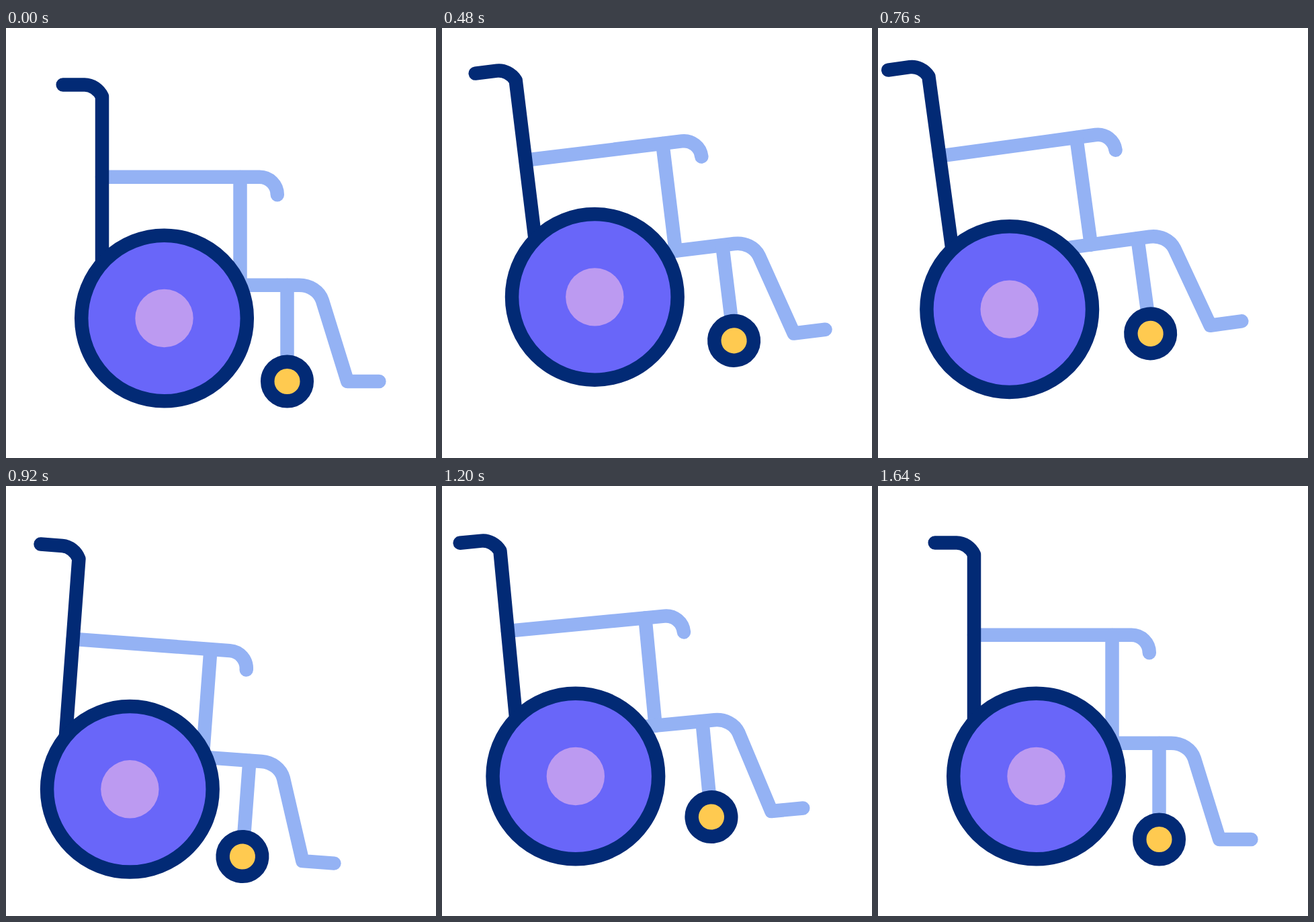
Write an HTML page that moves like this. It is 640 by 640 pixels and loops after 2 s.

```html
<!DOCTYPE html>
<html lang="en">
<head>
<meta charset="utf-8">
<title>Wheelchair</title>
<style>
  html, body { margin: 0; width: 100%; height: 100%; overflow: hidden; background: #fff; }
  svg { display: block; width: 100%; height: 100%; }
  .line { fill: none; stroke-width: 20.5; stroke-linecap: round; stroke-linejoin: round; }
  .light { stroke: #94b2f4; }
  .navy { stroke: #022a75; }
</style>
</head>
<body>
<svg viewBox="0 0 640 640">
  <g id="chair">
    <g class="line light">
      <path d="M143 221.8H377.3C392 221.8 403.8 233.6 403.8 248.3"/>
      <path d="M348.5 222V383"/>
      <path d="M282 382.8H436.5C452 382.8 466 391.5 470.8 405.5L508.2 526H555.4"/>
      <path d="M418.5 383V500"/>
    </g>
    <path class="line navy" d="M84.7 84.5H117C127.5 84.5 138 91.5 143 102V375"/>
    <circle class="line navy" cx="418.5" cy="526" r="29.3" style="fill:#ffca50"/>
  </g>
  <g id="wheel">
    <circle class="line navy" cx="235.5" cy="432" r="123.3" style="fill:#6966f9"/>
    <circle cx="235.5" cy="432" r="43.2" fill="#bc9af1"/>
  </g>
</svg>
<script>
  const LOOP = 2000;
  const chair = document.getElementById('chair');
  const wheel = document.getElementById('wheel');

  // Keys are [time, value]; values run smoothly and rest at each extreme.
  const shift = track([[320, 0], [960, -51.7], [1080, -45.5], [1360, -22.7], [1440, -14.2], [1640, 0]]);
  const tilt = track([[320, 0], [640, -13.8], [960, 5], [1200, -5.45], [1360, -2.88], [1440, -1.25], [1640, 0]]);
  const lift = track([[320, 0], [640, -93.5], [960, 23.6], [1200, -23.2], [1360, -8.6], [1640, 0]]);
  const hop = track([[320, 0], [620, -57], [880, 20.5], [1160, 0]]);

  // Monotone cubic interpolation through the keys.
  function track(keys) {
    const last = keys.length - 1;
    const rate = i => (keys[i + 1][1] - keys[i][1]) / (keys[i + 1][0] - keys[i][0]);
    const slopes = keys.map((key, i) => {
      if (i === 0 || i === last) return 0;
      const a = rate(i - 1), b = rate(i);
      return a * b > 0 ? 2 * a * b / (a + b) : 0;
    });
    return t => {
      if (t <= keys[0][0]) return keys[0][1];
      if (t >= keys[last][0]) return keys[last][1];
      let i = 0;
      while (t >= keys[i + 1][0]) i++;
      const [t0, v0] = keys[i], [t1, v1] = keys[i + 1];
      const span = t1 - t0, u = (t - t0) / span, w = 1 - u;
      return v0 * w * w * (1 + 2 * u) + v1 * u * u * (3 - 2 * u)
        + span * u * w * (slopes[i] * w - slopes[i + 1] * u);
    };
  }

  function draw(t) {
    const x = shift(t);
    chair.setAttribute('transform', `translate(${x} ${lift(t)}) rotate(${tilt(t)} 320 320)`);
    wheel.setAttribute('transform', `translate(${x} ${hop(t)})`);
  }

  const start = performance.now();
  function tick() {
    draw((performance.now() - start) % LOOP);
    requestAnimationFrame(tick);
  }
  draw(0);
  requestAnimationFrame(tick);
</script>
</body>
</html>
```
